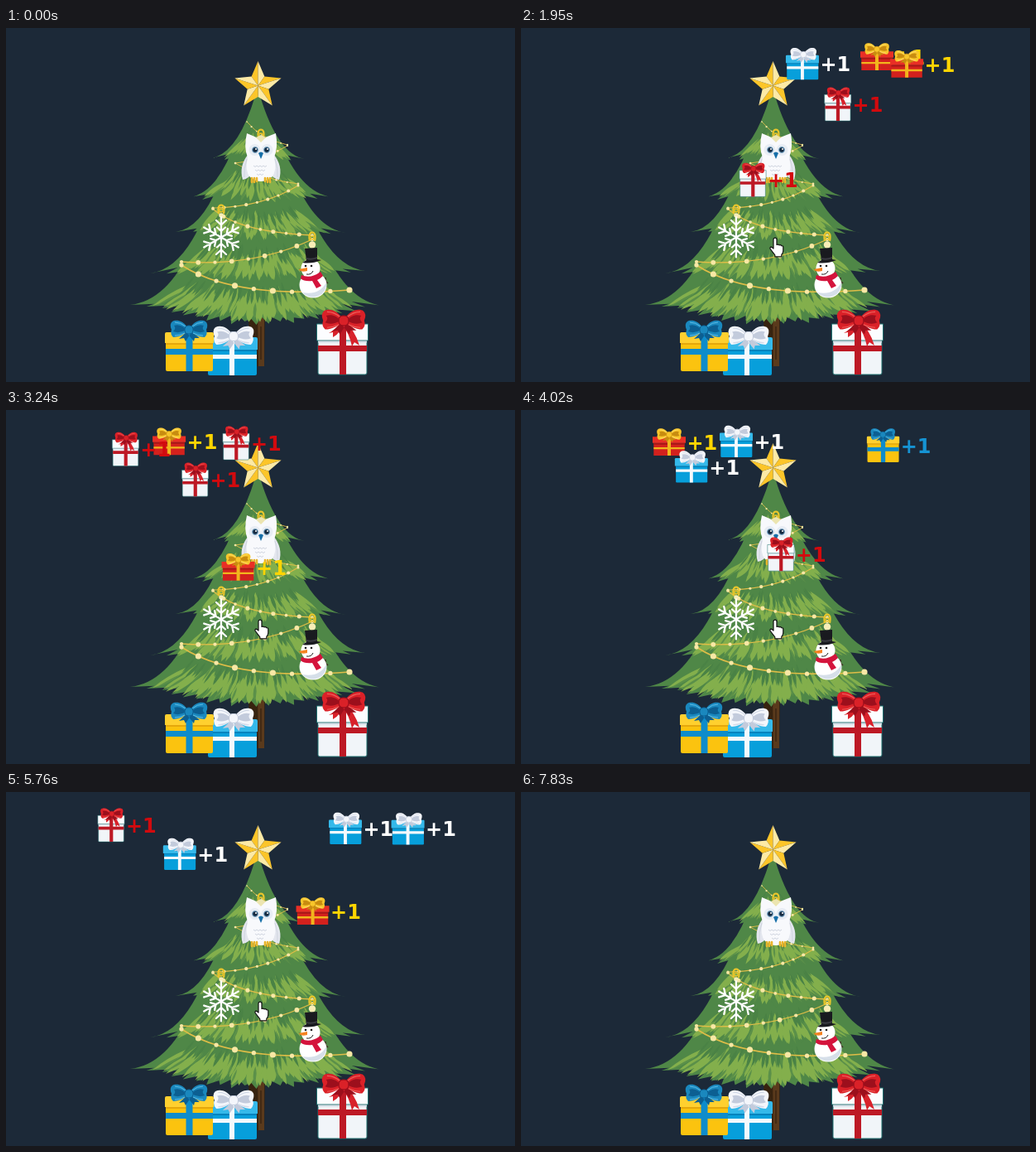
These frames come from a looping animation (615x427 px, 8280 ms). An HTML page:

```html
<!DOCTYPE html>
<html lang="en">
<head>
<meta charset="utf-8">
<title>Tree clicks</title>
<style>
  html, body { margin: 0; width: 100%; height: 100%; overflow: hidden; background: #1c2938; }
  svg { display: block; }
  text { font: bold 24px "DejaVu Sans", Verdana, sans-serif; }
</style>
</head>
<body>
<svg width="615" height="427" viewBox="0 0 615 427">
  <defs>
    <g id="loop">
      <path fill="var(--c)" d="M0 0C-7-13-17-12-20-10Q-24-7-21 0Q-23 5-19 9C-12 9-4 5 0 0z"/>
      <path fill="var(--d)" d="M-3 0C-7-5-13-7-18-5Q-15-2-19 2Q-12 5-3 0z"/>
      <path fill="none" stroke="var(--h)" d="M-4-4Q-10-9-17-9M-5 4Q-11 7-17 7"/>
    </g>
    <g id="bow">
      <path fill="var(--d)" d="M0 0L-12 11L-6 10L-4 14L3 3zM0 0L13 10L7 10L6 14L-3 3z"/>
      <use href="#loop"/><use href="#loop" transform="scale(-1 1)"/>
      <rect x="-5" y="-5" width="10" height="10" rx="4" fill="var(--c)" stroke="var(--d)"/>
    </g>
    <g id="Y">
      <path fill="#fbc30f" d="M1 27H58V59Q58 61 56 61H3Q1 61 1 59z"/>
      <path fill="#e5a80c" d="M1 27H58V29H1z"/>
      <path fill="#ffd02f" d="M0 16Q0 14 2 14H57Q59 14 59 16V27H0z"/>
      <path fill="#0e8ccb" d="M25.500 14H33.500V61H25.500zM1 34H58V41H1z"/>
      <use href="#bow" transform="translate(29 11)" style="--c:#1a88be;--d:#0c5f92;--h:#5dbde8"/>
    </g>
    <g id="L">
      <path fill="#079fdb" d="M2 28H61V57Q61 59 59 59H4Q2 59 2 57z"/>
      <path fill="#0783bd" d="M2 28H61V30H2z"/>
      <path fill="#35b9ea" d="M0 15Q0 13 2 13H60Q62 13 62 15V28H0z"/>
      <path fill="#f5f9fc" d="M28 13H34V59H28zM2 34H61V39H2z"/>
      <use href="#bow" transform="translate(33 12) scale(1.1)" style="--c:#f4f6fb;--d:#c3cbdc;--h:#d2d9e8"/>
    </g>
    <g id="W">
      <path fill="#f1f5f9" stroke="#1f706f" d="M2 36H61V75Q61 77 59 77H4Q2 77 2 75z"/>
      <path fill="#fcfdff" stroke="#1f706f" d="M.5 16H62.500V36H.5z"/>
      <path fill="#d4dde6" d="M2 36.500H61V38.500H2z"/>
      <path fill="#bd1925" d="M28 16H36V77H28zM2 42H61V49H2z"/>
      <path fill="#d8222b" d="M34 14Q46 22 52 42L46 38L43 43Q40 28 31 16zM31 15Q30 27 20 32L20 26L15 27Q25 22 29 13z"/>
      <use href="#bow" transform="translate(33 12) scale(1.18)" style="--c:#da2128;--d:#9c0f1c;--h:#f0605c"/>
    </g>
    <g id="R">
      <path fill="#d3211d" d="M2 25H58V48H2z"/>
      <path fill="#a81717" d="M2 25H58V28H2z"/>
      <path fill="#e92f25" d="M0 14H60V25H0z"/>
      <path fill="#f2b51d" d="M27 14H33V48H27zM2 33H58V36.500H2z"/>
      <use href="#bow" transform="translate(30 10)" style="--c:#f8c62b;--d:#c88c10;--h:#ffe483"/>
    </g>
    <g id="ring" fill="none" stroke="#e9c62b" stroke-width="2.200">
      <path d="M-3 5Q-5-5 0-5.500Q5-5 3 5"/><circle cy="1" r="2" stroke-width="1.300"/>
    </g>
  </defs>

  <path fill="#37230f" d="M293 342H313L312 408H294z"/>
  <path fill="#5a3a1c" d="M304 342H312V408H305z"/>
  <path stroke="#2b1b0c" d="M308 360V400M299 365V404"/>
  <g id="tree"></g>
  <g id="garlands" fill="none" stroke="#dfbd47"></g>
  <g id="star"></g>

  <!-- owl -->
  <use href="#ring" x="308" y="128"/>
  <path fill="#e3e6ee" d="M293 152Q281 166 286 183Q294 182 299 172H317Q322 182 330 183Q335 166 323 152z"/>
  <path fill="#f8f9fc" d="M291 127Q299 130 308 135Q317 130 326 127Q329 144 324 156Q328 172 321 180Q308 190 295 180Q288 172 292 156Q287 144 291 127z"/>
  <path fill="#ece5b0" d="M302 132L308 129L314 132L308 138z"/>
  <path fill="none" stroke="#cfd4df" d="M291 158Q287 170 288 180M325 158Q329 170 328 180M299 166q2 3 4 0q2 3 4 0q2 3 4 0q2 3 4 0M301 171q2 3 4 0q2 3 4 0q2 3 4 0M303 176q2 3 4 0q2 3 4 0"/>
  <g fill="#e8edf4"><circle cx="300.500" cy="147" r="7"/><circle cx="315.500" cy="147" r="7"/></g>
  <g fill="#15293f" stroke="#78abcf"><circle cx="301" cy="147" r="3.400"/><circle cx="315" cy="147" r="3.400"/></g>
  <g fill="#fff"><circle cx="302" cy="146" r="1"/><circle cx="316" cy="146" r="1"/></g>
  <path fill="#176fa8" d="M305 151Q308 148 311 151L308 158z"/>
  <path fill="none" stroke="#e9b52c" stroke-width="2.600" stroke-linecap="round" d="M297 181v5M300 181v5M303 181v4M313 181v4M316 181v5M319 181v5"/>

  <!-- snowflake -->
  <use href="#ring" x="260" y="219"/>
  <circle cx="260" cy="226" r="2.800" fill="#f9eeb7"/>
  <g id="flake" fill="none" stroke="#fff" stroke-width="2.300" stroke-linecap="round"></g>

  <!-- snowman -->
  <use href="#ring" x="370" y="252"/>
  <circle cx="370" cy="261.500" r="4.200" fill="#f9eeb7"/>
  <path stroke="#3d2a20" stroke-width="1.500" d="M380 300L389 308M386 305L386 301"/>
  <ellipse cx="371" cy="310" rx="16.500" ry="15.500" fill="#fff"/>
  <path fill="#d6dfe9" d="M387 307A16.500 15.500 0 0 1 358 319Q378 323 387 307z"/>
  <circle cx="368" cy="290" r="11.500" fill="#fff"/>
  <path fill="#d4143c" d="M357 298Q368 303 380 294L383 299Q379 303 376 304L381 311L375 314L370 305Q360 306 356 302z"/>
  <path fill="#191a1f" d="M361 266L376 265L376 279L381 280Q369 285 358 283L363 280z"/>
  <path fill="#3a3b42" d="M362 277Q370 279 376 276V278Q369 281 363 279z"/>
  <path fill="#f58220" d="M364 289L354 291Q356 295 364 293z"/>
  <path fill="none" stroke="#222" d="M363 297Q369 298 371 293"/>
  <g fill="#222"><circle cx="362" cy="287" r="1.300"/><circle cx="369" cy="287" r="1.300"/></g>

  <use href="#L" x="242" y="360"/>
  <use href="#Y" x="192" y="353"/>
  <use href="#W" x="375" y="341"/>
  <g id="gifts"></g>
  <path id="hand" fill="#fff" stroke="#111" stroke-width="1.200" stroke-linejoin="round"
    d="M5 14V3.200a2 2 0 0 1 4 0V9.500q1.800-1 3 .5q1.800-.8 2.800.8q2-.3 2 1.700v4q0 3-2 5v2.300H6.800v-2L1.200 14.500q-.8-2 1-2.300q1 0 2.800 1.800z"/>
</svg>
<script>
const $ = id => document.getElementById(id);
const LOOP = 8280, LIFE = 955, RISE = 700, START = { x: 303, y: 207 };

let seed = 11;
const rnd = () => (seed = seed * 16807 % 2147483647) / 2147483647;
const lerp = (a, b, p) => a + (b - a) * p;
const clamp = p => Math.min(1, Math.max(0, p));
const easeOut = (p, power) => 1 - (1 - p) ** power;
const xy = (x, y) => x.toFixed(1) + ' ' + y.toFixed(1);

// Tree tiers: top y, half width at top, left tip, right tip, sag of the lower edge
function tier([top, half, lx, ly, rx, ry, sag]) {
  const pt = (u, v) => [
    lerp(304 + (u * 2 - 1) * half, lerp(lx, rx, u), v ** 3),
    lerp(top, lerp(ly, ry, u) + sag * Math.sin(Math.PI * u), v)
  ];
  const bend = (x, y, side) => xy(lerp(304 + side * half, x, .4), lerp(top, y, .93));
  const n = Math.round((rx - lx) / 15);
  let d = `M${xy(304 - half, top)}Q${bend(lx, ly, -1)} ${xy(lx, ly)}`;
  for (let i = 1; i <= n; i++) {
    const u = i / n, toCentre = (.5 - u) * .06;
    d += `L${xy(...pt(u - .5 / n + toCentre, .93 - rnd() * .06))}L${xy(...pt(u, i < n ? .95 + rnd() * .06 : 1))}`;
  }
  let out = `<path fill="#4f8747" d="${d}Q${bend(rx, ry, 1)} ${xy(304 + half, top)}z"/>`;

  const blades = (count, color, from, spread, len, width) => {
    let p = '';
    for (let i = 0; i < count; i++) {
      const u = .06 + .86 * (i + rnd()) / count, v = from + rnd() * spread;
      const w = width * (.7 + rnd() * .6) / (rx - lx), end = Math.min(v + len, .96);
      const a = pt(u, v), b = pt(u, end), m = (v + end) / 2;
      p += `M${xy(...a)}Q${xy(...pt(u - w, m))} ${xy(...b)}Q${xy(...pt(u + w, m))} ${xy(...a)}`;
    }
    out += `<path fill="${color}" d="${p}"/>`;
  };
  blades(n * 2, '#83af4c', .5, .16, .34, 9);
  blades(n, '#83af4c', .6, .12, .25, 10);
  blades(n, '#5b9049', .5, .3, .22, 4);
  blades(n, '#4a8245', .44, .1, .24, 6);
  return out;
}
$('tree').innerHTML = [
  [265, 80, 150, 334, 455, 335, 24],
  [220, 62, 174, 296, 434, 293, 14],
  [180, 44, 205, 246, 411, 247, 13],
  [135, 26, 222, 204, 394, 204, 10],
  [82, 3, 248, 157, 361, 158, 8]
].map(tier).join('');

// Garlands: curve, number of beads, bead radius
[
  ['M291 113Q308 134 340 141', 7, 1],
  ['M340 142Q310 160 277 163Q310 183 353 188', 11, 1.2],
  ['M353 190Q310 216 250 217', 8, 1.8],
  ['M250 218Q280 246 370 250', 8, 2.2],
  ['M370 255Q300 288 212 282', 8, 2.5],
  ['M212 286Q275 327 415 316', 9, 3.1]
].forEach(([d, n, r]) => {
  const g = $('garlands');
  g.insertAdjacentHTML('beforeend', `<path d="${d}" stroke-width="${.5 + r * .35}"/>`);
  const line = g.lastChild, total = line.getTotalLength();
  for (let i = 0; i <= n; i++) {
    const p = line.getPointAtLength(total * i / n);
    g.insertAdjacentHTML('beforeend',
      `<circle cx="${p.x}" cy="${p.y}" r="${r * (i % 2 ? 1.15 : .85)}" fill="#f8e8a5" stroke="none"/>`);
  }
});

const polar = (r, deg) => {
  const a = deg * Math.PI / 180;
  return xy(304.5 + r * Math.sin(a), 69.5 - r * Math.cos(a));
};
for (let i = 0; i < 5; i++) for (const side of [-1, 1])
  $('star').innerHTML += `<path fill="${side > 0 ? '#fdeaa6' : '#fcc529'}" d="M304.500 69.500L${polar(29.5, i * 72)}L${polar(13.5, i * 72 + side * 36)}z"/>`;

for (let a = 0; a < 360; a += 60)
  $('flake').innerHTML += `<path transform="translate(260 252.500) rotate(${a})" d="M0 0V-24M-6-20.500L0-15L6-20.500M-5-12L0-7.500L5-12"/>`;

// Width, height, scale and label colour of the flying gifts
const KINDS = {
  Y: [59, 61, .667, '#1593d3'],
  L: [62, 59, .645, '#fff'],
  W: [63, 77, .52, '#d20a0e'],
  R: [60, 48, .667, '#ffd500']
};
// Kind, launch time, final centre x, final top
const gifts = [
  ['L', 960, 254, 20], ['R', 1140, 430, 19], ['L', 1330, 340, 24], ['R', 1512, 475, 18],
  ['W', 1710, 414, 19], ['W', 1892, 204, 19], ['Y', 2080, 477, 20], ['L', 2266, 400, 20],
  ['W', 2450, 278, 20], ['R', 2610, 197, 22], ['W', 2790, 137, 19], ['W', 2976, 205, 19],
  ['R', 3196, 179, 23], ['L', 3320, 260, 19], ['Y', 3504, 440, 19], ['L', 3703, 187, 19],
  ['W', 3948, 342, 19], ['W', 4138, 240, 20], ['Y', 4326, 436, 20], ['R', 4514, 205, 22],
  ['L', 4700, 370, 20], ['W', 4886, 127, 20], ['L', 5090, 410, 25], ['L', 5276, 491, 20],
  ['L', 5468, 187, 19], ['R', 5644, 463, 20], ['Y', 5830, 136, 20], ['W', 6046, 445, 20],
  ['L', 6236, 189, 24], ['W', 6420, 376, 19], ['L', 6608, 127, 19], ['R', 6860, 379, 24]
].map(([kind, launch, x, y]) => {
  const [w, h, s, color] = KINDS[kind];
  $('gifts').insertAdjacentHTML('beforeend',
    `<g><use href="#${kind}" transform="scale(${s}) translate(${-w / 2} 0)"/>` +
    `<text x="${w * s / 2 + 1.5}" y="${h * s / 2 + 9}" fill="${color}">+1</text></g>`);
  return { el: $('gifts').lastChild, launch, x, y };
});

// Quadratic curve through a bend
const arc = (a, b, c, p) => lerp(lerp(a, b, p), lerp(b, c, p), p);

function frame() {
  const t = performance.now() % LOOP;
  for (const { el, launch, x, y } of gifts) {
    const age = t - launch, p = easeOut(clamp(age / RISE), 3);
    el.setAttribute('display', age >= 0 && age < LIFE ? 'inline' : 'none');
    el.setAttribute('transform', `translate(${lerp(START.x, x, p)} ${lerp(START.y, y, p)})`);
  }
  // The pointer swoops in from the upper right and later darts out to the right
  const enter = easeOut(clamp((t - 90) / 600), 2), leave = clamp((t - 7130) / 300) ** 2;
  $('hand').setAttribute('display', t >= 90 && t < 7430 ? 'inline' : 'none');
  $('hand').setAttribute('transform',
    `translate(${arc(584, 430, 300, enter) + 318 * leave} ${arc(125, 318, 252, enter) - 23 * Math.sqrt(leave)})`);
  requestAnimationFrame(frame);
}
frame();
</script>
</body>
</html>
```
